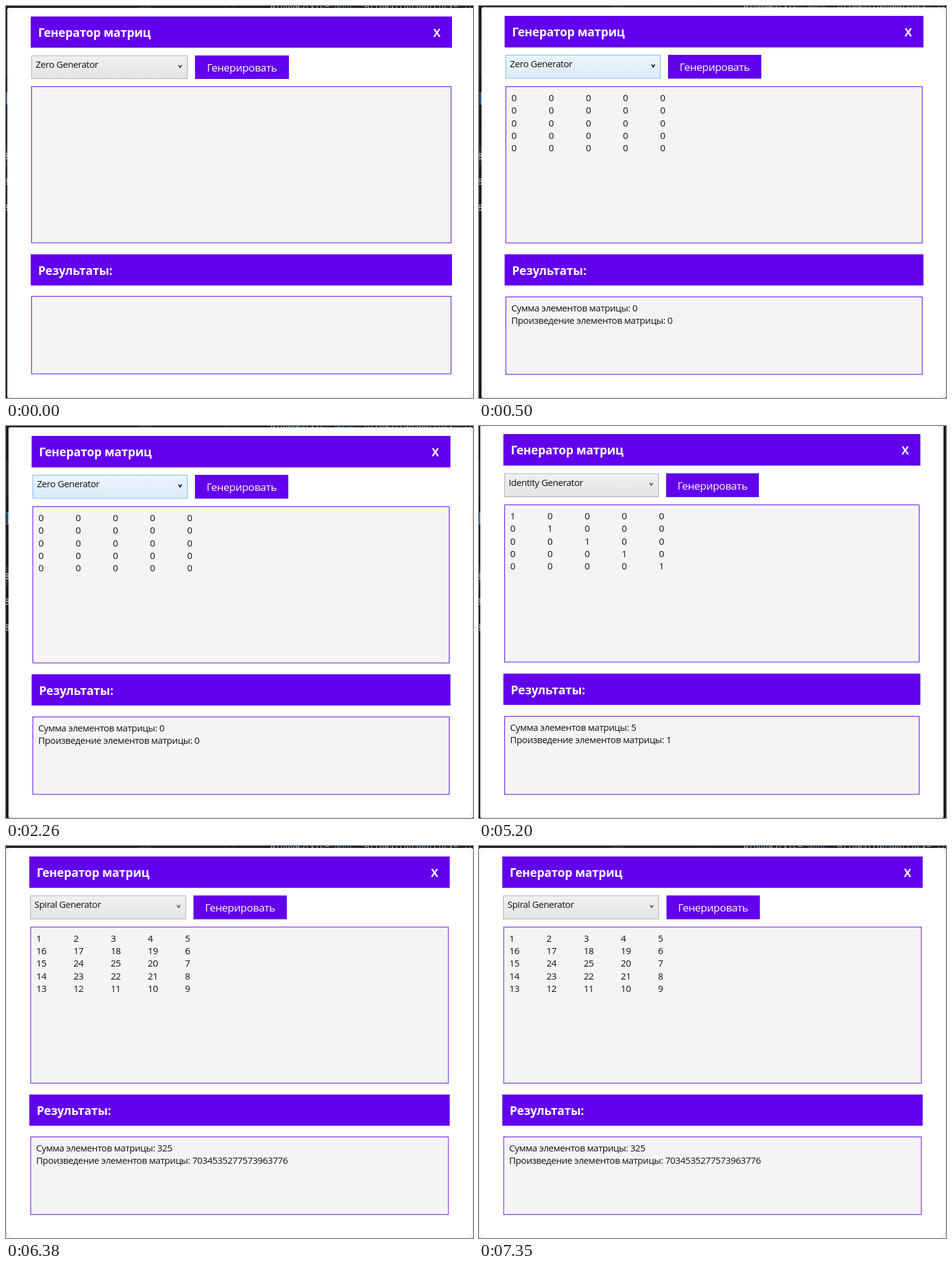
An HTML page that plays this animation: 756 by 634 pixels, repeating every 8000 ms.

```html
<!DOCTYPE html>
<html lang="ru">
<head>
<meta charset="utf-8">
<title>Генератор матриц</title>
<style>
  html, body { margin: 0; width: 100%; height: 100%; overflow: hidden; background: #1b1a1d; }
  svg { display: block; width: 756px; height: 634px; }
  text { font-family: "Open Sans", "Noto Sans", sans-serif; white-space: pre; }
  .title { font-size: 19.2px; font-weight: 700; letter-spacing: -.2px; fill: #fff; }
  .close { font-size: 18px; font-weight: 700; fill: #fff; text-anchor: end; }
  .button { font-size: 17.2px; letter-spacing: -.36px; fill: #fff; text-anchor: middle; }
  .body { font-size: 15px; letter-spacing: -.44px; fill: #111; }
  .code { font: 13.3px "DejaVu Sans Mono", monospace; fill: #8fb4d0; }
  .code .value { fill: #4b7fb5; }
  .side { font: 13.3px "DejaVu Sans Mono", monospace; fill: #d6d8e0; }
</style>
</head>
<body>
<svg id="stage" viewBox="0 0 756 634">
  <defs>
    <linearGradient id="plain" x2="0" y2="1">
      <stop stop-color="#f0f0f0"/><stop offset="1" stop-color="#e4e4e4"/>
    </linearGradient>
    <linearGradient id="hover" x2="0" y2="1">
      <stop stop-color="#ecf4fc"/><stop offset="1" stop-color="#dbebfb"/>
    </linearGradient>
  </defs>
</svg>
<script>
const ACCENT = '#6200ee';
const LOOP = 8000;

const spiral = (w, h, x, y) => y ? w + spiral(h - 1, w, y - 1, w - x - 1) : x + 1;

// Boxes are [left, top, right, bottom].
const scenes = [
  { start: 0, name: 'Zero Generator', arrow: '#333',
    win: [2, 3, 757, 634], head: [40, 17, 722, 67.5], combo: [41, 80, 294, 118],
    button: [306, 80, 458, 118], grid: [41, 130, 721, 383.5],
    results: [40, 401.5, 722, 452], output: [41, 469, 721, 595.5] },
  { start: 500, name: 'Zero Generator', hover: true, arrow: '#000',
    cell: () => 0, sum: '0', product: '0',
    win: [4, 2, 756, 634], head: [41.5, 16, 719.5, 67], combo: [43, 79, 294, 117.5],
    button: [306, 79, 457, 117.5], grid: [43, 130, 718, 383.7],
    results: [41.5, 401.5, 719.5, 452], output: [43, 470, 718, 596.3] },
  { start: 3440, name: 'Identity Generator', arrow: '#555',
    cell: (x, y) => +(x === y), sum: '5', product: '1',
    win: [2, -1, 752, 634], head: [39.5, 13, 714.5, 64], combo: [41, 76.5, 291, 115],
    button: [303, 76.5, 453, 115], grid: [41, 127, 713, 382.3],
    results: [39.5, 400.5, 714.5, 451], output: [41, 469, 713, 596.3] },
  { start: 6380, name: 'Spiral Generator', arrow: '#555',
    cell: (x, y) => spiral(5, 5, x, y), sum: '325', product: '7034535277573963776',
    win: [0, 3, 756, 635], head: [37.7, 17, 718.3, 67.7], combo: [39, 80, 291.5, 118.5],
    button: [303.5, 80, 454.7, 118.5], grid: [39.5, 130.6, 716.6, 384],
    results: [37.7, 402, 718.3, 452.5], output: [39.5, 470, 716.6, 596.5] }
];

const rect = ([l, t, r, b], fill, extra = '') =>
  `<rect x="${l}" y="${t}" width="${r - l}" height="${b - t}" fill="${fill}" ${extra}/>`;

const framed = ([l, t, r, b], fill, stroke, extra = '') =>
  rect([l + .5, t + .5, r - .5, b - .5], fill, `stroke="${stroke}" ${extra}`);

const text = (cls, x, y, str) => `<text class="${cls}" x="${x}" y="${y}">${str}</text>`;

function backdrop([left, top]) {
  const side = [243, 284, 326].map(y => text('side', left - 6, y + 5, '8')).join('');
  const code = 'WindowStyle=<tspan class="value">"None"</tspan> ' +
    'AllowsTransparency=<tspan class="value">"True"</tspan>';
  return rect([0, 0, 756, 634], '#1b1a1d') +
    rect([215, 0, 235, 3], '#2d2d31') +
    rect([0, 54, 4, 115], '#29292c') +
    rect([0, 226, 4, 259], '#303033') +
    rect([0, 183, 4, 184], '#3a3a3d') +
    framed([left - 8, 140, left, 159], '#1c3a66', '#6f9fd8') +
    rect([355, 0, 356, 4], '#444') + rect([367, 0, 368, 4], '#444') +
    side + text('code', 428, top + 1, code);
}

function matrix({ grid: [l, t], cell }) {
  let out = '';
  for (let y = 0; y < 5; y++)
    for (let x = 0; x < 5; x++)
      out += text('body', l + 9.5 + x * 60.2, t + 24 + y * 20.3, cell(x, y));
  return out;
}

function draw(s) {
  const { win, head, combo, button, grid, results, output } = s;
  const [ax, ay] = [combo[2] - 12, combo[1] + 15.5];
  let out = backdrop(win) +
    rect(win, '#f6f6f6', 'rx="3"') +
    framed(win, '#fff', '#e2e2e2', 'rx="12"') +
    rect(head, ACCENT) +
    text('title', head[0] + 12, head[1] + 33, 'Генератор матриц') +
    text('close', head[2] - 18.5, head[1] + 32.5, 'X') +
    framed(combo, `url(#${s.hover ? 'hover' : 'plain'})`, s.hover ? '#7eb4ea' : '#acacac') +
    text('body', combo[0] + 7, combo[1] + 20, s.name) +
    `<path d="M${ax - 2.6} ${ay}l2.6 4 2.6 -4" fill="none" stroke="${s.arrow}" stroke-width="1.5"/>` +
    rect(button, ACCENT) +
    text('button', (button[0] + button[2]) / 2, button[1] + 26, 'Генерировать') +
    framed(grid, '#f4f4f4', ACCENT) +
    rect(results, ACCENT) +
    text('title', results[0] + 12, results[1] + 33, 'Результаты:') +
    framed(output, '#f4f4f4', ACCENT);
  if (s.cell) {
    const [x, y] = [output[0] + 9.3, output[1] + 24];
    out += matrix(s) +
      text('body', x, y, `Сумма элементов матрицы: ${s.sum}`) +
      text('body', x, y + 20.3, `Произведение элементов матрицы: ${s.product}`);
  }
  return `<g class="scene" display="none">${out}</g>`;
}

const stage = document.getElementById('stage');
stage.insertAdjacentHTML('beforeend', scenes.map(draw).join(''));
const groups = stage.querySelectorAll('.scene');
let shown = -1;

function tick() {
  const time = performance.now() % LOOP;
  const current = scenes.filter(s => s.start <= time).length - 1;
  if (current !== shown) {
    groups.forEach((g, i) => g.setAttribute('display', i === current ? 'inline' : 'none'));
    shown = current;
  }
  requestAnimationFrame(tick);
}
tick();
</script>
</body>
</html>
```
